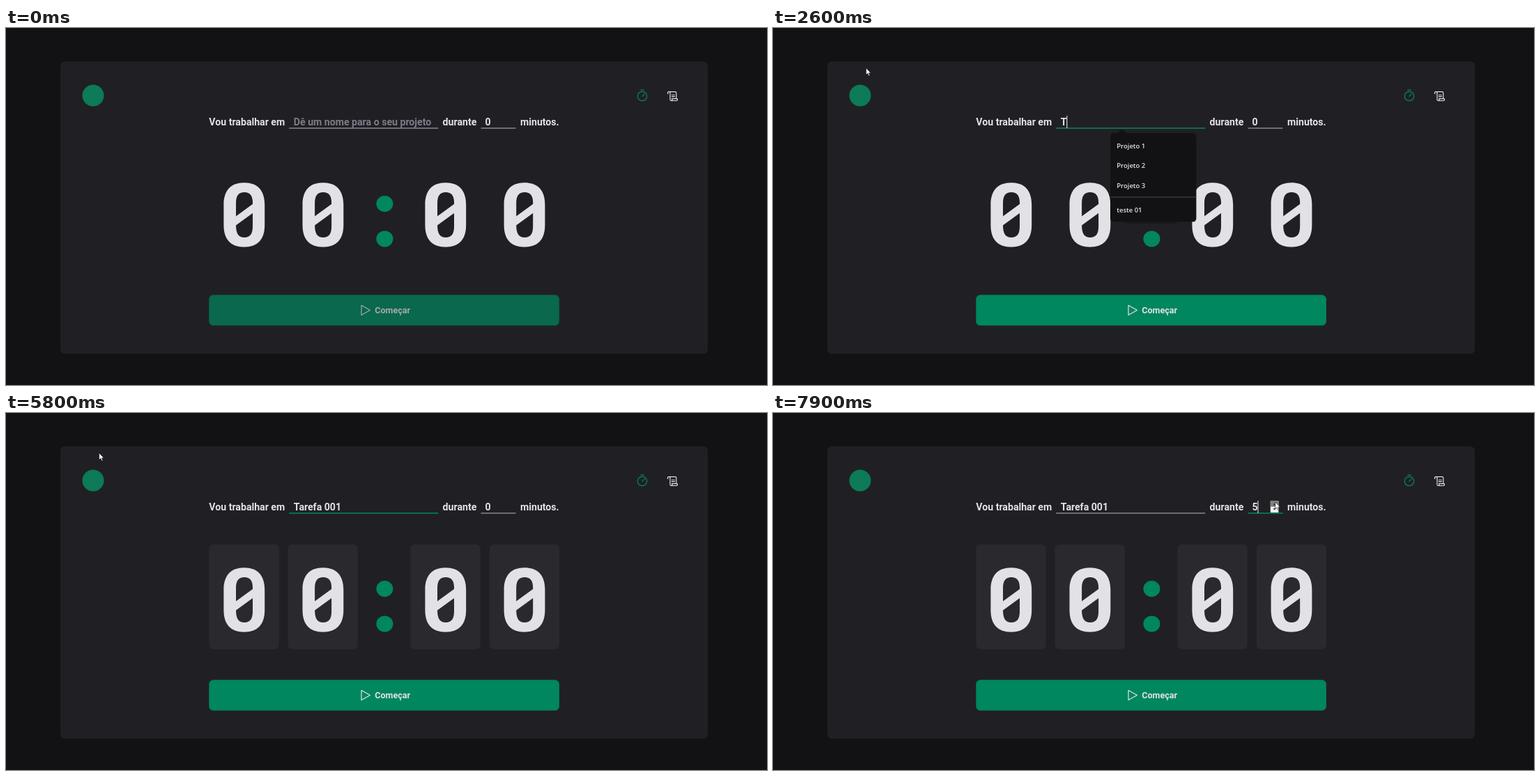
An HTML page that plays this animation: 1092 by 513 pixels, repeating every 8 s.

```html
<!DOCTYPE html>
<html lang="pt-BR">
<head>
<meta charset="utf-8">
<title>Timer</title>
<style>
html, body { margin: 0; width: 100%; height: 100%; overflow: hidden; background: #121214; }
svg { display: block; width: 100%; height: 100%; }
text { font: 700 14.13px Roboto, sans-serif; fill: #e1e1e6; white-space: pre; }
.label { font-size: 12.56px; }
.menu text { font: 600 9.5px "Open Sans", sans-serif; }
.line { fill: none; stroke-width: 1.2; stroke-linecap: round; stroke-linejoin: round; }
</style>
</head>
<body>
<svg viewBox="0 0 1092 513">
  <defs>
    <path id="zero" fill="#e1e1e6" fill-rule="evenodd" d="M312.4 254C312.4 233 323 222.3 341.8 222.3S371.2 233 371.2 254V283C371.2 304 361 314.7 341.8 314.7S312.4 304 312.4 283Z
      M330 270.5V251C330 241 334 236 342 236S354 241 354 251V253Z M330 283.5C330 296 334 301 342 301S354 296 354 285V266Z"/>
  </defs>
  <rect x="78" y="48" width="929" height="420" rx="6.3" fill="#202024"/>
  <circle cx="125" cy="97" r="15.5" fill="#0d7a58"/>

  <rect id="ring" y="78.2" width="39.4" height="39.4" fill="none" stroke="#00875f" stroke-width="1.57"/>
  <g class="line" stroke="#00875f">
    <circle cx="913" cy="98" r="6.7"/>
    <path d="M910.8 89.2H915.3M913 98L916.2 94.8"/>
  </g>
  <g class="line" stroke="#e1e1e6" transform="translate(947.1 88.6) scale(.0736)" style="stroke-width:16">
    <path d="M112 104H168M112 136H168M38 80A24 24 0 1 1 80 64V192A24 24 0 0 0 104 216H200A24 24 0 0 0 218 176H114A24 24 0 0 1 104 216M56 40H176A24 24 0 0 1 200 64V176"/>
  </g>

  <text x="291.3" y="140">Vou trabalhar em</text>
  <text x="626.6" y="140">durante</text>
  <text x="738" y="140">minutos.</text>
  <rect id="taskLine" x="406.2" y="143.2" width="214" height="1.5"/>
  <rect id="minLine" x="681.5" y="143.2" width="50" height="1.5"/>
  <rect id="select" x="687.6" y="126" width="8.2" height="18" fill="#0a40c0"/>
  <text id="task" x="412.8" y="139.5"></text>
  <text id="mins" x="687.6" y="139.5"></text>
  <rect id="caret" y="126" width="1.1" height="18" fill="#e1e1e6"/>
  <g id="spinner">
    <rect x="713.8" y="126.5" width="11.6" height="16.5" fill="#f4f4f4"/>
    <rect id="press" x="713.8" y="126.5" width="11.6" height="8.2"/>
    <path d="M717.4 132.6L719.6 130L721.8 132.6ZM717.4 137L719.6 139.6L721.8 137Z" fill="#333"/>
  </g>

  <g id="cards" fill="#29292e"></g>
  <g id="digits"></g>
  <g fill="#00875f">
    <ellipse cx="543.4" cy="252.6" rx="12" ry="11.6"/>
    <ellipse cx="543.4" cy="303" rx="12" ry="11.6"/>
  </g>

  <g id="button">
    <rect x="291.3" y="383.6" width="502.6" height="44" rx="6.3" fill="#00875f"/>
    <path class="line" stroke="#e1e1e6" d="M510 398.6V412.4L522.4 405.5Z"/>
    <text class="label" x="529.3" y="410">Começar</text>
  </g>

  <g id="menu" class="menu">
    <rect x="504" y="276" width="77" height="4.8" rx="2" fill="#1a1a1c"/>
    <path d="M493 152L501 146L509 152Z" fill="#121214"/>
    <rect x="484" y="151" width="123.4" height="127.6" rx="5" fill="#121214"/>
    <path d="M484 243H607.4" stroke="#4a4a4e"/>
    <text x="493.2" y="173">Projeto 1</text>
    <text x="493.2" y="201.3">Projeto 2</text>
    <text x="493.2" y="229.6">Projeto 3</text>
    <text x="493.2" y="264.7">teste 01</text>
  </g>
  <path id="mouse" d="M0 0V9.8L2.2 7.8L3.9 11.4L5.5 10.7L3.9 7.2H6.9Z" fill="#fff" stroke="#000" stroke-width=".6"/>
</svg>
<script>
const LOOP = 8000;
const GREEN = '#00875f', GREY = '#85858f';
const $ = id => document.getElementById(id);
const set = (id, attrs) => { for (const k in attrs) $(id).setAttribute(k, attrs[k]); };
const show = (id, on) => set(id, { visibility: on ? 'visible' : 'hidden' });
const within = (t, a, b) => t >= a && t < b;

// Last entry of a [time, ...values] list that has been reached
const at = (list, t) => list.filter(e => e[0] <= t).pop();

const typing = [2600, 2800, 3100, 3200, 3600, 3700, 3900, 4600, 4800, 5300];
const caretOn = [[1600, 2100], [2600, 4400], [4600, 5800], [7400, LOOP]];
const mousePath = [
  [0, 10, -11], [100, 68, 18], [200, 118, 47], [300, 132.6, 57],
  [1800, 133.6, 57.5], [6500, 190, 49], [6600, 430, 73], [6700, 591, 104],
  [6800, 651, 116], [6900, 685, 121], [7000, 704, 124], [7100, 713, 125.5],
  [7200, 716.5, 126], [7600, 720.8, 128]
];

for (const dx of [0, 113.1, 289, 402.2]) {
  $('cards').innerHTML += `<rect x="${291.4 + dx}" y="189" width="100.4" height="150.4" rx="6.3"/>`;
  $('digits').innerHTML += `<use href="#zero" x="${dx}"/>`;
}

function draw(t) {
  const typed = typing.filter(k => k <= t).length;
  const onMins = t >= 6000;

  show('ring', within(t, 800, 1600));
  set('ring', { x: t < 1300 ? 893.3 : 937 });

  $('task').textContent = typed ? 'Tarefa 001'.slice(0, typed) : 'Dê um nome para o seu projeto';
  $('task').style.fill = typed ? '#e1e1e6' : '#7c7c8a';
  $('mins').textContent = t < 7900 ? '0' : '5';
  set('taskLine', { fill: within(t, 1600, 6000) ? GREEN : GREY });
  set('minLine', { fill: onMins ? GREEN : GREY });

  const field = $(onMins ? 'mins' : 'task');
  const width = typed ? field.getComputedTextLength() : 0;
  set('caret', { x: +field.getAttribute('x') + width - .3 });
  show('caret', caretOn.some(([a, b]) => within(t, a, b)));

  show('select', within(t, 6000, 7400));
  show('spinner', onMins);
  set('press', { fill: t >= 7900 ? '#808080' : t >= 7200 ? '#d0d0d0' : '#f4f4f4' });

  show('menu', within(t, 2600, 2800));
  show('cards', within(t, 2800, 6000) || t >= 7400);
  set('button', { opacity: typed ? 1 : .7 });

  const [, x, y] = at(mousePath, t);
  set('mouse', { transform: `translate(${x} ${y})` });
}

const start = performance.now();
function tick() {
  draw((performance.now() - start) % LOOP);
  requestAnimationFrame(tick);
}
tick();
</script>
</body>
</html>
```
